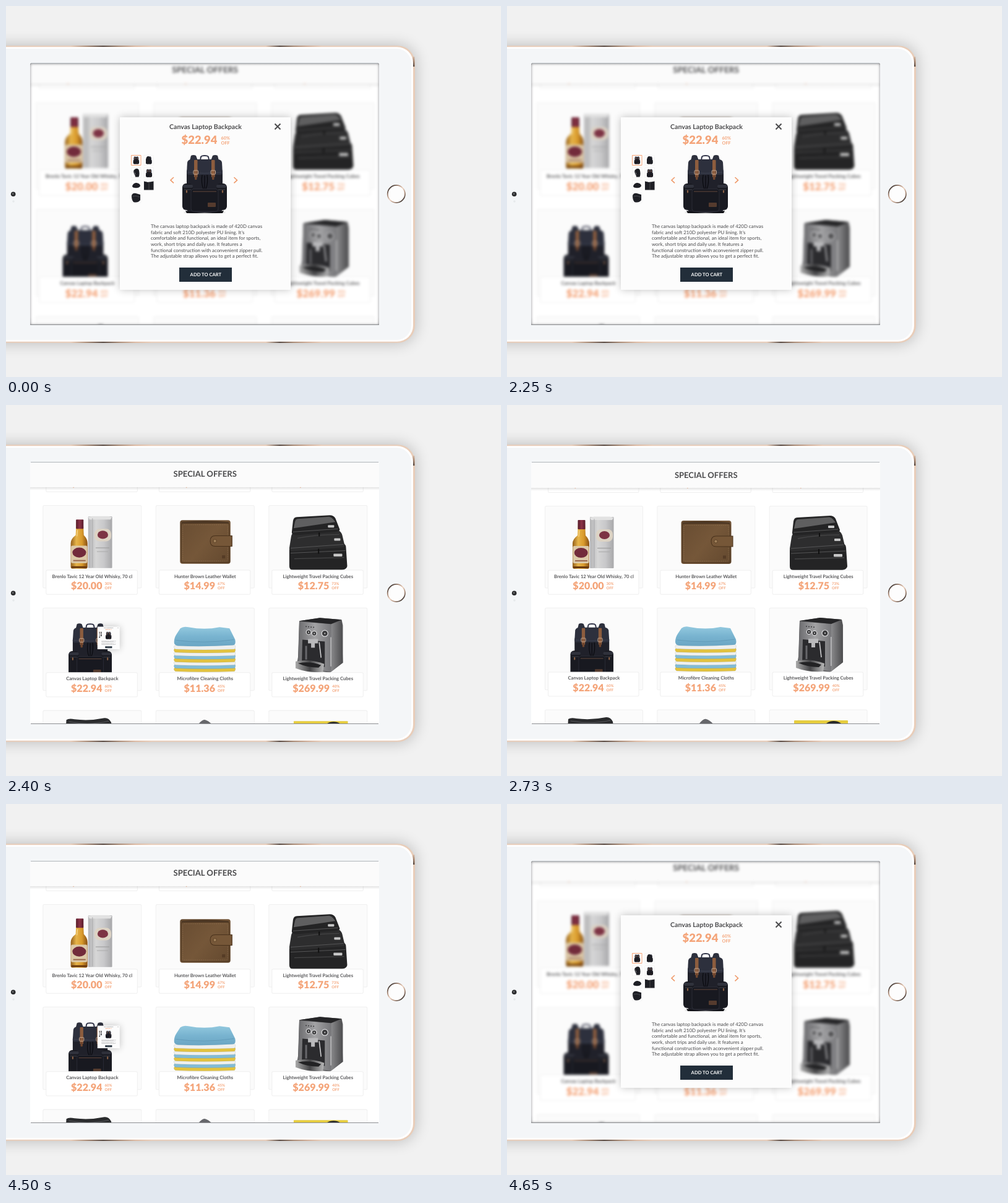
Write an HTML page with a canvas that moves like this. It is 800x600 px and loops after 4.68 s.

```html
<!DOCTYPE html>
<html lang="en">
<head>
<meta charset="utf-8">
<title>Special offers</title>
<style>
html, body { margin: 0; width: 100%; height: 100%; overflow: hidden; background: #f1f1f1; }
#stage { position: relative; width: 800px; height: 600px; overflow: hidden; }
#stage canvas { position: absolute; left: 0; top: 0; }
#screen { position: absolute; left: 39px; top: 93px; width: 564px; height: 423px; overflow: hidden;
  background: linear-gradient(#6d6d70, #8c8c90 8px, #8c8c90 410px, #5c5c60); }
</style>
</head>
<body>
<div id="stage">
  <canvas id="tablet" width="800" height="600"></canvas>
  <div id="screen"><canvas id="page" width="564" height="423"></canvas></div>
  <canvas id="popup" width="800" height="600"></canvas>
</div>
<script>
const LOOP = 4680, STEP = 30, CLOSE = 2250, CLOSED = 2790, REOPEN = 4380, OPEN = 4650, EASE = 510;
const ORANGE = '#f4a479', INK = '#4b4b4d';
const $ = id => document.getElementById(id);
const layer = id => {
  const ctx = $(id).getContext('2d');
  ctx.textRendering = 'geometricPrecision';
  return ctx;
};
const tablet = layer('tablet'), page = layer('page'), popup = layer('popup');
let c = tablet;

function box(x, y, w, h, r, fill, stroke, lw = 1) {
  c.beginPath();
  c.roundRect(x, y, w, h, r);
  paint(fill, stroke, lw);
}
function paint(fill, stroke, lw = 1) {
  if (fill) { c.fillStyle = fill; c.fill(); }
  if (stroke) { c.strokeStyle = stroke; c.lineWidth = lw; c.stroke(); }
}
function shape(d, fill, stroke, lw) {
  const path = new Path2D(d);
  if (fill) { c.fillStyle = fill; c.fill(path); }
  if (stroke) { c.strokeStyle = stroke; c.lineWidth = lw || 1; c.stroke(path); }
}
function oval(x, y, rx, ry, fill, stroke, lw) {
  c.beginPath();
  c.ellipse(x, y, rx, ry, 0, 0, 7);
  paint(fill, stroke, lw);
}
function text(s, x, y, size, weight, color, align = 'left') {
  c.font = `${weight} ${size}px Lato, sans-serif`;
  c.textAlign = align;
  c.fillStyle = color;
  c.fillText(s, x, y);
}
function grad(x0, y0, x1, y1, ...colors) {
  const g = c.createLinearGradient(x0, y0, x1, y1);
  colors.forEach((k, i) => g.addColorStop(i / (colors.length - 1), k));
  return g;
}
function at(x, y, s, draw) {
  c.save();
  c.translate(x, y);
  c.scale(s, s);
  draw();
  c.restore();
}

function drawTablet() {
  c = tablet;
  c.fillStyle = '#f1f1f1';
  c.fillRect(0, 0, 800, 600);
  const gold = '#e9cdb9', mid = '#a58671', dark = '#4b3e38';
  c.shadowColor = 'rgba(0,0,0,.24)';
  c.shadowBlur = 25;
  box(-60, 64.2, 721, 480.6, 28, gold);
  c.shadowColor = 'transparent';
  for (const y of [64.2, 542.8]) {
    c.fillStyle = grad(105, 0, 235, 0, gold, mid, dark, mid, '#dcb9a2', gold);
    c.fillRect(105, y, 130, 2);
    c.fillStyle = grad(420, 0, 510, 0, gold, dark, mid, '#d0ac96', gold);
    c.fillRect(420, y, 90, 2);
  }
  c.fillStyle = grad(0, 80, 0, 98, gold, mid, dark);
  c.fillRect(657.3, 82, 3, 16);
  box(-60, 66.2, 718, 476.6, 26, '#ffffff');
  box(-60, 69, 715, 471, 24, '#f4f6f8');
  oval(11.7, 304.2, 3.8, 3.8, '#2b2c2e');
  oval(11.2, 303.8, 1.3, 1.3, '#77797c');
  oval(12, 316, 1.8, 1.8, '#e6e9eb');
  oval(630.8, 304, 14.1, 14.1, '#fdfdfd', grad(620, 292, 642, 316, '#2f2a28', '#a98a78', '#f0d6c4', '#a98a78', '#2f2a28'), 1.8);
}

function backpack() {
  const navy = '#2d303d', body = '#20212a', tan = '#8d5d3e';
  shape('M12 10L14 2Q18 0 22 2L25 10M59 10L57 2Q53 0 49 2L46 10', navy);
  shape('M29 9L30 4Q31 2 36 2Q41 2 42 4L43 9', null, '#33364a', 2);
  box(7, 22, 58, 72, 6, body);
  box(0, 47, 17, 43, 6, '#191a21');
  box(55, 47, 17, 43, 6, '#191a21');
  shape('M8 13Q9 8 16 8H56Q63 8 64 13L65 30Q65 33 60 33H12Q7 33 7 30Z', navy);
  shape('M9 29Q36 32 63 29', null, '#3d4150', .9);
  box(1, 49, 16, 5, 2, '#30323c');
  box(55, 49, 16, 5, 2, '#30323c');
  shape('M32 33Q30 46 34 56M40 33Q42 46 38 56M36 34V62', null, '#08090d', 1.1);
  box(14, 56, 44, 36, 4, '#181920', '#343641', .7);
  shape('M17 60H55', null, '#775443', .8);
  shape('M3 57H14M58 57H69', null, '#494a52', .8);
  for (const x of [19, 47]) {
    box(x, 9, 5.5, 28, 1, tan);
    box(x - 1, 26, 7.5, 6, 1, null, '#c6a58c', 1);
    box(x + 1, 34, 3.5, 7, 1, '#6d442d');
  }
  oval(7, 60, 1.2, 2.6, '#8a6146');
  oval(65, 60, 1.2, 2.6, '#8a6146');
  box(41, 78, 13, 7, 1, '#553b2e');
  shape('M5 91Q36 98 67 91L65 95H7Z', '#101116');
}

function whisky() {
  box(134, 181, 38.5, 83, 1, grad(134, 0, 172, 0, '#b4b4b6', '#d6d6d6', '#c8c8ca', '#a9a9ab'));
  shape('M134 182L141 180.5H166L172 182L170 186H136Z', '#e2e2e2');
  shape('M141 184V263', null, '#a2a2a4', .8);
  box(144, 201, 27, 20, 8, '#ddd3c4');
  oval(157.5, 210.5, 8.5, 6.5, '#7d3344');
  box(146, 231, 22, 1, 0, '#999');
  box(148, 237, 18, 1, 0, '#aaa');
  shape('M115 190H126L127 211Q133 217 133 224V262Q133 265 130 265H109Q106 265 106 262V224Q106 217 114 211Z',
    grad(106, 0, 133, 0, '#94601c', '#e6b44a', '#d99a2c', '#885014'));
  box(114.5, 186, 12, 15, 1, grad(114, 0, 127, 0, '#531a29', '#8b3347', '#541a29'));
  shape('M117 203L116 213', null, '#f6d58a', 1.2);
  box(106.5, 228, 26, 28, 2, '#dcc9a8');
  oval(119.7, 239, 11, 8, '#722b3b');
  box(110, 251, 20, 2, 0, '#9b6a50');
  box(107, 261, 25, 3, 1, '#69390f');
}

function wallet() {
  box(281.5, 187, 81, 70, 4, grad(281, 187, 362, 257, '#62482f', '#735538', '#5f452c'));
  shape('M284 190Q322 186 360 190V196H284Z', '#4c3724');
  box(283.5, 192, 77, 63, 3, grad(283, 192, 360, 255, '#694d32', '#755739', '#64492f'), '#503922', 1);
  c.setLineDash([2, 1.4]);
  box(286, 194.5, 72, 58, 2, null, '#8f7150', .6);
  c.setLineDash([]);
  shape('M365 212H338Q330 212 330 220.5Q330 229 338 229H365Z', '#765738', '#49321c', 1);
  oval(337.5, 220.5, 2.6, 2.6, '#a0805a', '#51381f', .8);
  box(349, 243.5, 5, 5, 0, '#553c26');
}

function cubes() {
  shape('M457 235Q457 230 462 230L542 224Q548 225 548 231L550 261Q549 266 542 267H463Q457 267 457 261Z', '#242425');
  shape('M460 213Q461 208 465 207L535 203Q540 205 542 211L546 228Q546 231 540 231L463 237Q457 237 457 232Z', '#2d2d2e');
  shape('M463 188Q464 182 469 182L522 179Q528 179 531 184L538 202Q538 205 531 206L468 211Q460 211 461 206Z', '#242425');
  shape('M466 190Q467 185 471 185L521 181.5Q525 182 527 185L531 190L464 200Z', '#5f5f60');
  shape('M463 206L535 201M459 232L544 226M459 240L547 236', null, '#555556', 1);
  shape('M470 216Q500 210 537 210M465 249L545 247', null, '#444445', 1.4);
  shape('M504 233V241M505 207V213', null, '#111', 2);
  box(519, 195, 10, 4, 1, '#c6c6c6');
  box(529, 216, 10, 4, 1, '#c6c6c6');
  box(528, 241, 14, 4.5, 1, '#c6c6c6');
}

function cloths() {
  const blue = '#82bcd6', yellow = '#e3c33f', white = '#eef0ef';
  [yellow, blue, white, yellow, blue, white, yellow, white].forEach((color, i) => {
    const y = 424 - i * 5.1;
    shape(`M273 ${y}Q300 ${y + 3} 369 ${y - 1}Q372 ${y + 2} 369 ${y + 6}Q320 ${y + 8} 274 ${y + 6}Q270 ${y + 3} 273 ${y}Z`,
      color, 'rgba(70,80,80,.2)', .6);
  });
  shape('M272 383Q272 376 276 370L282 361Q287 357 295 359Q321 364 345 359L361 361Q366 371 370 379Q372 388 366 388Q319 391 278 389Q272 388 272 383Z',
    grad(0, 358, 0, 389, '#93c9df', '#79b4d0', '#6ba6c4'));
  shape('M275 380Q320 386 368 379', null, '#619bb9', .9);
}

function coffee() {
  shape('M473 349L506 344L541 347L543 356V416L522 432L468 425L471 407Z', '#59595b');
  shape('M473 350L524 354V431L471 423Z', grad(472, 0, 524, 0, '#6c6c6f', '#a3a3a5', '#77777a'));
  shape('M524 354L541 348L543 416L524 431Z', grad(524, 0, 543, 0, '#8a8a8c', '#4b4b4d'));
  shape('M473 349L506 344L541 347L524 354Z', '#252527');
  shape('M478 379L514 382V423L477 418Z', '#2b2b2e');
  shape('M487 378H503V385H498V392H492V385H487Z', '#b9b9bb');
  shape('M505 383L508 408', null, '#d0d0d2', 1.6);
  shape('M484 389V411', null, '#66666a', 3);
  shape('M467 414Q489 409 513 418L511 431Q488 433 467 425Z', grad(467, 0, 513, 0, '#aaa', '#454547', '#bbb'));
  shape('M471 417Q490 413 508 420L504 424Q486 424 471 417Z', '#222224');
  for (const [x, y, r] of [[488, 367, 3.8], [497, 369, 3.8], [514, 369, 5]]) {
    oval(x, y, r, r, '#3b3b3d', '#dddddf', 1.2);
    oval(x, y, 1, 1, '#ddd');
  }
  for (let i = 0; i < 4; i++) oval(484 + i * 4, 358 + i * .4, 1, 1, '#3d3d3f');
  box(523, 375, 1.5, 47, 0, '#c0c0c2');
}

function nextRow() {
  shape('M99 508Q103 505 112 507Q136 510 160 505Q167 504 171 512L175 540H97Z', '#2a2b2d');
  shape('M103 511Q136 517 167 510', null, '#55565a', 1);
  shape('M307 520Q317 506 322 508Q329 510 337 520Z', '#66676b');
  box(464, 510, 87, 30, 1, '#e6cd3f');
  oval(528, 521, 15, 10, '#27282a');
}

// name, price, discount, offset of the price group
const GOODS = [
  ['Brenlo Tavic 12 Year Old Whisky, 70 cl', '$20.00', '30%', 0],
  ['Hunter Brown Leather Wallet', '$14.99', '67%', 0],
  ['Lightweight Travel Packing Cubes', '$12.75', '73%', 1.8],
  ['Canvas Laptop Backpack', '$22.94', '60%', 0],
  ['Microfibre Cleaning Cloths', '$11.36', '45%', 0],
  ['Lightweight Travel Packing Cubes', '$269.99', '40%', -2]
];

function cards(draw) {
  for (let i = 0; i < 12; i++) {
    const col = i % 3, row = Math.floor(i / 3) - 1;
    draw(61.5 + col * 181.3, 163.5 + row * 164.7, GOODS[(row === 1 ? 3 : 0) + col]);
  }
}

function drawCard(x, y) {
  box(x, y, 158, 132.5, 2, '#fbfbfb', '#f0f0f0');
}

function drawLabel(x, y, [name, price, cut, dx]) {
  const mid = x + 79;
  box(x + 5, y + 103.7, 146.5, 39, 2, '#ffffff', '#efefef');
  text(name, mid, y + 116.2, 7.6, 700, '#5a5a5c', 'center');
  c.font = '900 16px Lato, sans-serif';
  const w = c.measureText(price).width, left = mid - 1 + dx - (w + 16) / 2;
  text(price, left, y + 134.6, 16, 900, ORANGE);
  text(cut, left + w + 4, y + 127.8, 6, 700, ORANGE);
  text('OFF', left + w + 4, y + 134.6, 6, 700, ORANGE);
}

function drawPage(p) {
  c = page;
  c.setTransform(1, 0, 0, 1, 0, 0);
  c.fillStyle = '#fff';
  c.fillRect(0, 0, 564, 423);
  c.translate(282, 211.5);
  const s = 1 + .05 * p;
  c.scale(s, s);
  c.translate(-321, -304.5);
  cards(drawCard);
  whisky();
  wallet();
  cubes();
  at(102.5, 352, .965, backpack);
  cloths();
  coffee();
  nextRow();
  cards(drawLabel);
  c.fillStyle = grad(0, 134, 0, 139, 'rgba(0,0,0,.11)', 'rgba(0,0,0,0)');
  c.fillRect(30, 134, 590, 5);
  c.fillStyle = '#fbfbfb';
  c.fillRect(30, 85, 590, 49);
  text('SPECIAL OFFERS', 321.7, 117.7, 13, 700, INK, 'center');
  $('page').style.filter = p > .002 ? `blur(${(2.3 * p).toFixed(3)}px)` : 'none';
}

const COPY = [
  'The canvas laptop backpack is made of 420D canvas',
  "fabric and soft 210D polyester PU lining. It's",
  'comfortable and functional, an ideal item for sports,',
  'work, short trips and daily use. It features a',
  'functional construction with aconvenient zipper pull.',
  'The adjustable strap allows you to get a perfect fit.'
];

function thumbs() {
  const dark = '#1e1f25';
  for (let i = 0; i < 7; i++) {
    const x = 202.5 + i % 2 * 20.4, y = 241.5 + (i >> 1) * 20.2;
    box(x, y, 15.5, 16, 0, '#fff', i ? '#f3f3f3' : ORANGE, 1);
  }
  at(205.6, 243, .132, backpack);
  at(226.2, 243, .132, backpack);
  shape('M226 248Q227 243 231 243Q236 245 234 255H226Z', dark);
  shape('M207 266Q211 262 214 265Q216 272 214 276H209M207 266Q206 270 210 275', dark, dark, 1.2);
  at(226, 263.5, .14, backpack);
  shape('M204 291Q206 286 211 286Q217 287 217 291Q215 295 208 294Q204 294 204 291Z', dark);
  shape('M223 283.5L230 285L238.5 283.5V297.5H223Z', dark);
  shape('M231 284V297', null, '#555', .8);
  shape('M203 307Q204 302 210 303L217 305V314Q213 319 206 317Q203 314 203 307Z', dark);
  shape('M204 308Q210 306 216 309', null, '#55565c', .7);
}

function drawPopup(p) {
  c = popup;
  c.setTransform(1, 0, 0, 1, 0, 0);
  c.clearRect(0, 0, 800, 600);
  // grey rules along the top and bottom of the display
  c.fillStyle = '#b0b5b9';
  c.fillRect(40, 92, 562, 1);
  c.fillStyle = '#8d8f92';
  c.fillRect(40, 515, 562, 1);
  if (p < .004) return;
  // grows out of the backpack card
  c.translate(142.4, 385.3);
  c.scale(p, p);
  c.translate(-142.4, -385.3);
  c.shadowColor = 'rgba(0,0,0,.24)';
  c.shadowBlur = 12;
  box(184, 180, 276, 279, 0, '#fcfcfc');
  c.shadowColor = 'transparent';
  text('Canvas Laptop Backpack', 322.5, 198.6, 10.6, 700, INK, 'center');
  shape('M434.5 190.5L443.5 199.5M443.5 190.5L434.5 199.5', null, INK, 2);
  text('$22.94', 283.6, 223.2, 18.4, 900, ORANGE);
  text('60%', 347.6, 215.8, 7.2, 700, ORANGE);
  text('OFF', 347.6, 224.3, 7.2, 700, ORANGE);
  thumbs();
  oval(321, 334, 34, 2, 'rgba(0,0,0,.12)');
  at(285, 240, 1, backpack);
  shape('M271 277L266 281.7L271 286.4M368.5 277L373.5 281.7L368.5 286.4', null, '#ef9a6b', 1.6);
  COPY.forEach((line, i) => text(line, 234, 359.2 + i * 9.6, 7.85, 400, INK));
  box(280, 423, 85, 23, 0, '#222e3a');
  text('ADD TO CART', 322.8, 437.3, 7.6, 700, '#fff', 'center');
}

const decay = ms => 2 ** (-10 * ms / EASE);
function openness(t) {
  if (t < CLOSE) return 1;
  if (t < CLOSED) return decay(t - CLOSE);
  if (t < REOPEN) return 0;
  return decay(Math.max(0, OPEN - t));
}

let start = null, shown = -1;
function tick(now) {
  if (start === null) start = now;
  const t = Math.floor((now - start) % LOOP / STEP) * STEP;
  const p = openness(t);
  if (p !== shown) {
    shown = p;
    drawPage(p);
    drawPopup(p);
  }
  requestAnimationFrame(tick);
}

drawTablet();
drawPage(1);
drawPopup(1);
requestAnimationFrame(tick);
</script>
</body>
</html>
```
